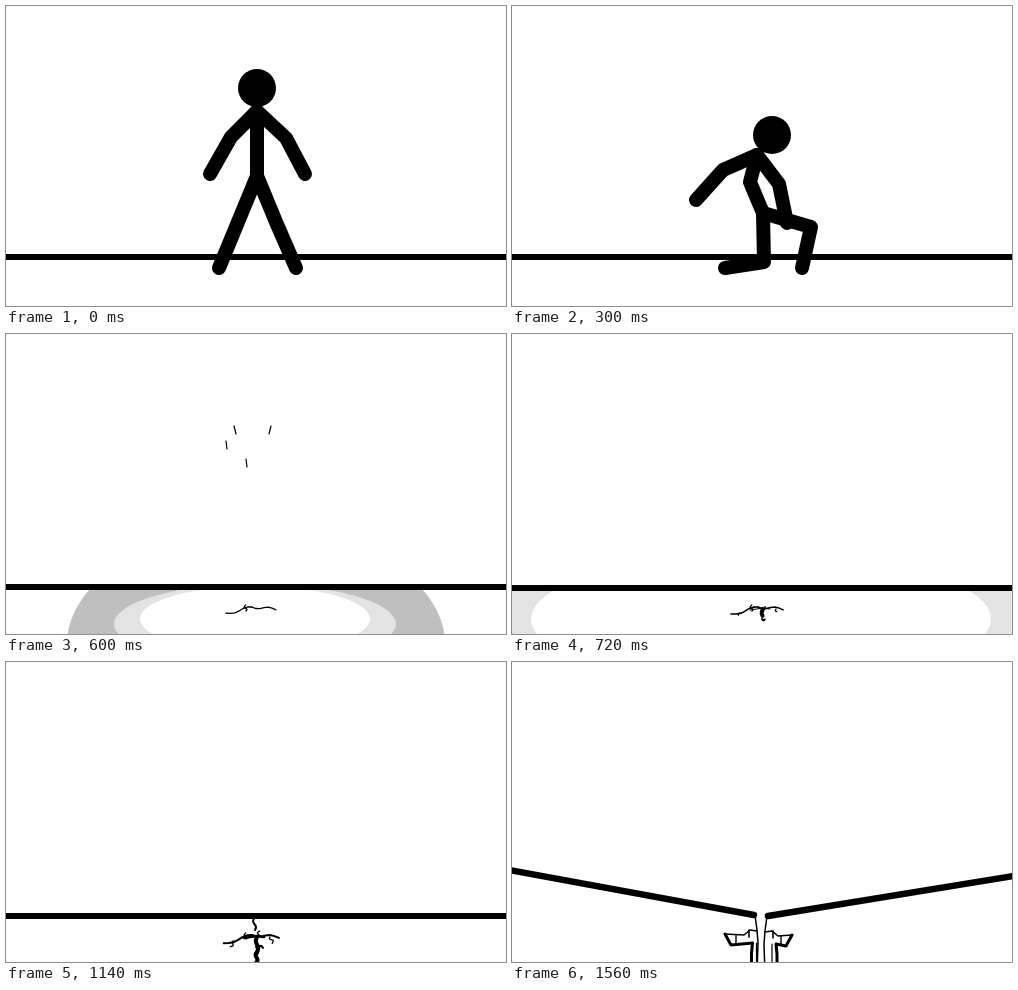
Recreate the animation shown at these times as an HTML page with a canvas. Size 500x300 px, loop 1.62 s.

```html
<!DOCTYPE html>
<html lang="en">
<head>
<meta charset="utf-8">
<title>Stick figure leap</title>
<style>
html, body { margin: 0; width: 100%; height: 100%; overflow: hidden; background: #fff; }
canvas { display: block; }
</style>
</head>
<body>
<canvas id="stage" width="500" height="300"></canvas>
<script>
const ctx = document.getElementById('stage').getContext('2d');
const LOOP = 1620, STEP = 60, LIMB = 14;

const lerp = (a, b, p) => a + (b - a) * p;
const mix = (a, b, p) => a.map((v, i) => lerp(v, b[i], p));
const span = (t, a, b) => Math.max(0, Math.min(1, (t - a) / (b - a)));
const ease = p => p * p * (3 - 2 * p);

const feet = [[213, 262], [290, 262]];
const stand = {
  head: [251, 82], neck: [251, 105], spine: [251, 137], hip: [251, 170],
  elbowL: [225, 131], handL: [204, 168], elbowR: [280, 132], handR: [299, 168],
  kneeL: [232, 216], kneeR: [270, 216],
};
const crouch = {
  head: [260, 129], neck: [245, 149], spine: [238, 176], hip: [251, 207],
  elbowL: [211, 164], handL: [184, 194], elbowR: [267, 178], handR: [275, 217],
  kneeL: [252, 256], kneeR: [299, 221],
};
const reach = {
  ...stand, spine: [253, 137], hip: [255, 173], handL: [208, 170],
  elbowR: [258, 62], handR: [251, 37], kneeL: [239, 214], kneeR: [272, 209],
};

function stroke(width, ...points) {
  ctx.lineWidth = width;
  ctx.beginPath();
  points.forEach(p => ctx.lineTo(...p));
  ctx.stroke();
}

function ellipse(x, y, rx, ry, color) {
  ctx.fillStyle = color;
  ctx.beginPath();
  ctx.ellipse(x, y, rx, ry, 0, 0, 7);
  ctx.fill();
}

function figure(t) {
  const down = t <= 300;
  const p = ease(down ? t / 300 : span(t, 300, 480));
  const [from, to] = down ? [stand, crouch] : [crouch, reach];
  const j = {};
  for (const name in from) j[name] = mix(from[name], to[name], p);
  // The right arm swings outwards on its way up
  if (!down) for (const name of ['elbowR', 'handR']) j[name][0] += 30 * Math.sin(p * Math.PI);

  ctx.save();
  ctx.translate(0, -190 * span(t, 480, 540));
  stroke(LIMB, j.neck, j.spine, j.hip);
  stroke(LIMB, j.neck, j.elbowL, j.handL);
  stroke(LIMB, j.neck, j.elbowR, j.handR);
  stroke(LIMB, j.hip, j.kneeL, feet[0]);
  stroke(LIMB, j.hip, j.kneeR, feet[1]);
  if (t >= 480) stroke(LIMB, j.handR, [243, 68], j.elbowR);
  ellipse(...j.head, 19, 19, '#000');
  ctx.restore();
}

function speedLines(p) {
  const line = (x, y, lean) => {
    const top = y - 10 * p;
    stroke(lerp(3, 1.2, p), [x, top], [x + lean * (1 - 2 * p), top + lerp(18, 8, p)]);
  };
  line(228, 102, -2);
  line(265, 102, 2);
  line(240, 135, -1);
  line(220, 117, -1);
}

// Three nested ellipses leave two widening rings under the ground
function shock(t) {
  const p = (t - 480) / 120;
  ctx.save();
  ctx.beginPath();
  ctx.rect(0, 255, 500, p ? 45 : 32);
  ctx.clip();
  ellipse(250 + 1.5 * (1 - p), lerp(271.5, 310, p), lerp(19.5, 189, p), lerp(16, 115, p), p ? '#bfbfbf' : '#cbcbcb');
  ellipse(249, 290, 141 * p, 40 * p, '#e3e3e3');
  ellipse(249, 285, 115 * p, 33 * p, '#fff');
  ctx.restore();
}

// A jagged line from a to b, drawn up to the share p
function jag(width, a, b, p = 1) {
  const n = 6, dx = b[0] - a[0], dy = b[1] - a[1], len = Math.hypot(dx, dy);
  const points = Array.from({ length: n + 1 }, (_, i) => {
    const q = i / n * p, bend = 1.3 * Math.sin(q * 7);
    return [a[0] + dx * q - dy / len * bend, a[1] + dy * q + dx / len * bend];
  });
  if (p) stroke(width, ...points);
}

function crack(t) {
  const grow = span(t, 600, 900), open = span(t, 1020, 1140);
  const width = lerp(1.3, 2, grow);
  jag(width, [246, 273], [lerp(220, 218, grow), lerp(280, 282, grow)]);
  jag(width, [246, 273], [lerp(270, 273, grow), 275]);
  for (let i = 0; i < 4; i++) {
    const x = 228 + 12 * i, y = 279 - 2 * Math.min(i, 2), up = i % 3 ? -1 : 1;
    jag(1.3, [x, y], [x - 3 + 2 * i, y + 6 * up], i === 1 ? 1 : grow);
  }
  if (grow) stroke(2.6 * grow, [238, 276], [251, 274], [258, 275]);
  jag(4, [251, 275], [251, 292], grow);
  jag(2, [250, 285], [257, 285], grow);
  jag(2, [249, 268], [248, 255], open);
  jag(4, [251, 290], [250, 302], open);
}

// One half of the split ground: x is the distance from the gap
function half(side, p, slope, wall, tip, drop) {
  ctx.save();
  ctx.translate(249 + side * 3 * p, drop * p);
  ctx.scale(side, 1);
  stroke(6.5, [4, 242], [264, 242 - 260 * slope]);
  stroke(1.5, [3, 242], [1, 257], [0, 270], [1, 302]);
  stroke(1.2, [wall - 5, 270], [wall - 5, 302]);
  stroke(1.6, [1, 258], [8, 257], [14, 262], [tip, 261]);
  stroke(1.6, [9, 257], [9, 264]);
  stroke(1.4, [tip - 11, 262], [tip - 11, 271]);
  stroke(3, [tip, 261], [tip - 6, 272], [wall - 1, 270], [wall, 280], [wall, 302]);
  ctx.restore();
}

function draw(t) {
  ctx.fillStyle = '#fff';
  ctx.fillRect(0, 0, 500, 300);
  ctx.strokeStyle = '#000';
  ctx.lineCap = ctx.lineJoin = 'round';

  if (t >= 1320) {
    const p = (t - 1320) / 240;
    half(-1, p, 0.184, 6.5, 33, 11);
    half(1, p, 0.163, 13, 28, 12);
    return;
  }
  if (t >= 480 && t < 900) shock(t);
  ctx.fillStyle = '#000';
  ctx.fillRect(0, 248 + Math.round(3 * span(t, 360, 780)), 500, 6);
  if (t < 600) figure(t);
  if (t >= 480 && t <= 600) speedLines((t - 480) / 120);
  if (t >= 600) crack(t);
}

function tick(now) {
  let t = Math.floor(now % LOOP / STEP) * STEP;
  if (t > 900 && t < 1080) t = 900;
  if (t > 1140 && t < 1320) t = 1140;
  draw(t);
  requestAnimationFrame(tick);
}
tick(performance.now());
</script>
</body>
</html>
```
